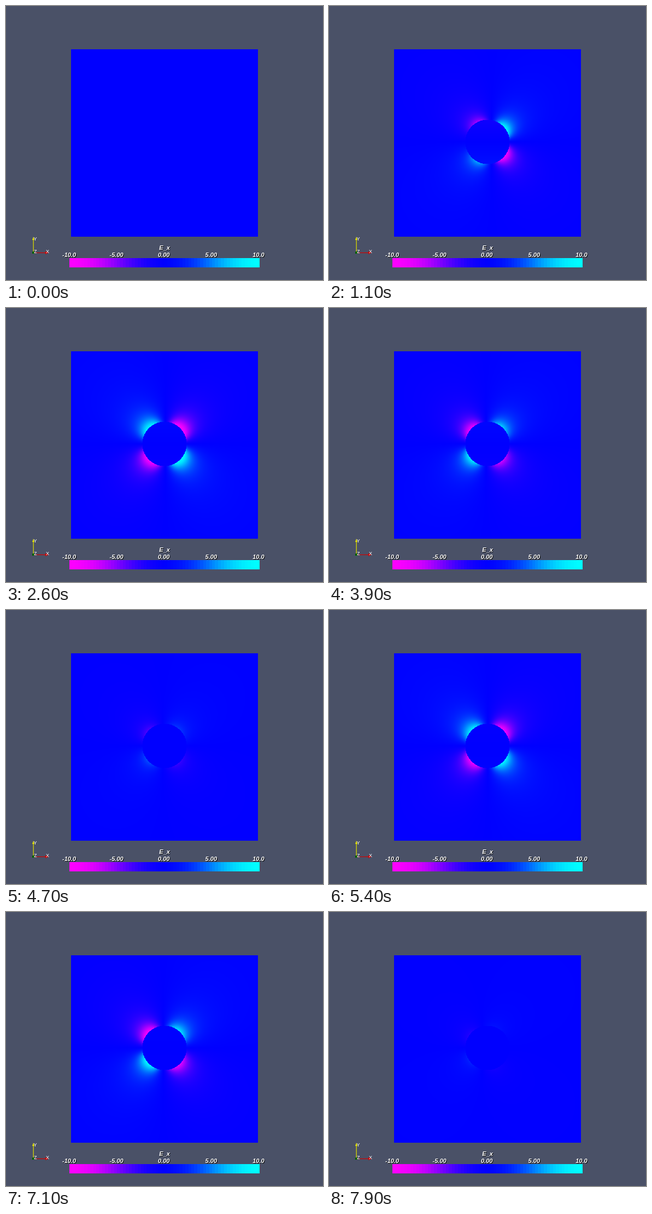
Write an HTML page with a canvas that moves like this. It is 580 px wide and 500 px high and loops after 8000 ms.

```html
<!DOCTYPE html>
<html lang="en">
<head>
<meta charset="utf-8">
<title>E_x field</title>
<style>
  html, body { margin: 0; width: 100%; height: 100%; overflow: hidden; background: #4a5167; }
  canvas { display: block; }
</style>
</head>
<body>
<canvas id="stage" width="580" height="500"></canvas>
<script>
const ctx = document.getElementById('stage').getContext('2d');
const LOOP = 8000, STEP = 100, PERIOD = 30;
const HOLDS = [1, 29, 57];               // ticks that repeat the previous picture
const PLANE = { x: 119, y: 79, size: 342 };
const ROD = { x: 171, y: 169, radius: 40.5 };

// Magenta - blue - cyan, flattened near the ends and the middle
function tone(value) {
  const u = Math.min(Math.abs(value) / 10, 1);
  return 255 * (u - 0.1 * Math.sin(2 * Math.PI * u));
}

// Spatial patterns: dipole and quadrupole outside the rod, linear field inside
const count = PLANE.size ** 2;
const inside = new Uint8Array(count);
const dipole = new Float32Array(count);
const quad = new Float32Array(count);
for (let i = 0; i < count; i++) {
  const x = i % PLANE.size + 0.5 - ROD.x;
  const y = ROD.y - Math.floor(i / PLANE.size) - 0.5;
  const r = Math.hypot(x, y), k = ROD.radius / r, angle = Math.atan2(y, x);
  inside[i] = r < ROD.radius ? 1 : 0;
  dipole[i] = Math.sin(2 * angle) * k ** 2;
  quad[i] = inside[i] ? y / ROD.radius : -Math.sin(3 * angle) * k ** 3;
}

function amplitudes(n) {
  const ramp = 1 - Math.exp(-n / 7);
  const wave = Math.sin(2 * Math.PI * (n - 2) / PERIOD);
  const c = Math.cos(2 * Math.PI * (n - 1) / PERIOD);
  const onset = -3.6 * ramp * Math.exp(-(((n - 10) / 7) ** 2));
  const swing = 1.4 * ramp * (c + c * c);
  return {
    dip: ramp * (9.6 * wave - 0.5),
    inner: swing + 0.4 * onset,
    outer: swing + onset + 0.012 * n
  };
}

const image = ctx.createImageData(PLANE.size, PLANE.size);
function drawField(n) {
  const { dip, inner, outer } = amplitudes(n);
  const px = image.data;
  for (let i = 0; i < count; i++) {
    const v = inside[i] ? inner * quad[i] : dip * dipole[i] + outer * quad[i];
    const shade = tone(v), p = i * 4;
    px[p] = v < 0 ? shade : 0;
    px[p + 1] = v > 0 ? shade : 0;
    px[p + 2] = px[p + 3] = 255;
  }
  ctx.putImageData(image, PLANE.x, PLANE.y);
}

function label(text, x, y) {
  ctx.fillStyle = '#000';
  ctx.fillText(text, x + 1, y + 1);
  ctx.fillStyle = '#fff';
  ctx.fillText(text, x, y);
}

function drawScale() {
  const bands = 64, left = 116, width = 348;
  for (let i = 0; i < bands; i++) {
    const v = 20 * i / (bands - 1) - 10, shade = tone(v);
    const x0 = Math.round(left + width * i / bands);
    const x1 = Math.round(left + width * (i + 1) / bands);
    ctx.fillStyle = `rgb(${v < 0 ? shade : 0}, ${v > 0 ? shade : 0}, 255)`;
    ctx.fillRect(x0, 460, x1 - x0, 17);
  }
  ctx.font = 'italic bold 11px "Liberation Sans", Arial, sans-serif';
  ctx.textAlign = 'center';
  label('E_x', 290, 445);
  ['-10.0', '-5.00', '0.00', '5.00', '10.0'].forEach((text, i) =>
    label(text, 115.5 + 86.6 * i, 458));
}

function triangle(color, ...points) {
  ctx.fillStyle = color;
  ctx.beginPath();
  points.forEach(([x, y]) => ctx.lineTo(x, y));
  ctx.fill();
}

function drawAxes() {
  ctx.fillStyle = '#d8d800';
  ctx.fillRect(49.5, 426, 1.3, 23);
  triangle('#e6e600', [50, 421], [52, 427], [48, 427]);
  ctx.fillStyle = '#d00000';
  ctx.fillRect(52, 449.7, 21, 1.2);
  triangle('#d00000', [78, 450.3], [72, 447.5], [72, 453]);
  ctx.fillStyle = '#006000';
  ctx.fillRect(48, 448, 4, 4);
  ctx.font = '9px "Liberation Sans", Arial, sans-serif';
  ctx.textAlign = 'left';
  ctx.fillStyle = '#fff';
  ctx.fillText('Y', 50.5, 428);
  ctx.fillText('Z', 51, 450.5);
  ctx.fillText('X', 73, 450.5);
}

ctx.fillStyle = '#4a5167';
ctx.fillRect(0, 0, 580, 500);
drawScale();
drawAxes();

let shown = -1;
const start = performance.now();
function render() {
  const time = Math.max(0, performance.now() - start) % LOOP;
  const tick = Math.floor(time / STEP);
  const n = tick - HOLDS.filter(hold => tick >= hold).length;
  if (n !== shown) drawField(shown = n);
  requestAnimationFrame(render);
}
render();
</script>
</body>
</html>
```
